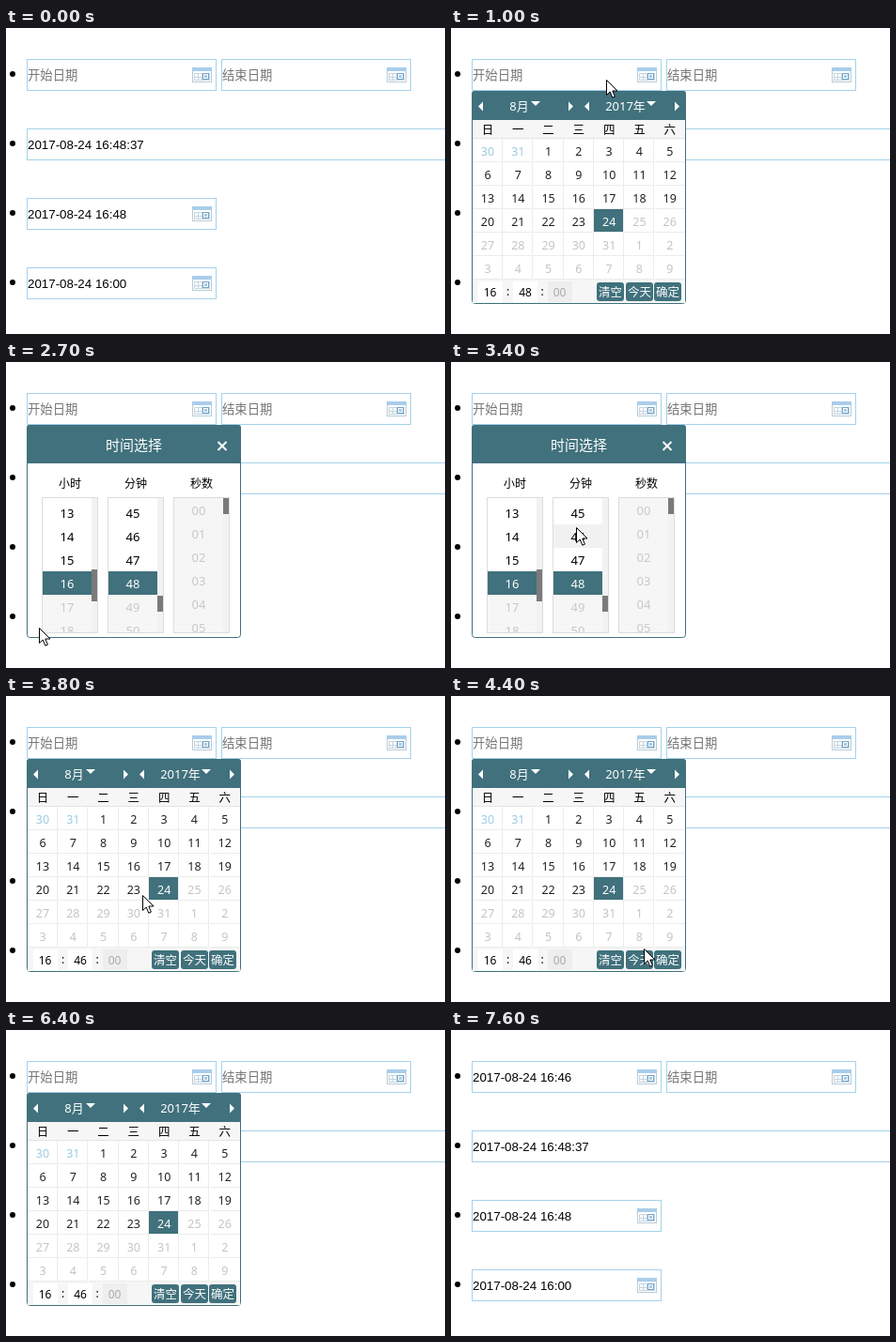
An HTML page that plays this animation: 467x326 px, repeating every 8000 ms.

```html
<!DOCTYPE html>
<html lang="zh-CN">
<head>
<meta charset="utf-8">
<title>日期选择</title>
<style>
html, body { margin: 0; width: 100%; height: 100%; overflow: hidden; background: #fff; }
svg { display: block; }
text { font-family: "Noto Sans", "Noto Sans CJK SC", sans-serif; white-space: pre; }
.field { font-family: "Liberation Sans", "Noto Sans CJK SC", sans-serif; font-size: 13.333px; }
</style>
</head>
<body>
<svg id="stage" width="467" height="326" viewBox="0 0 467 326"></svg>
<script>
const LOOP = 8000;
const TEAL = '#40717c', LINE = '#ececec', PALE = '#f6f6f6', MUTED = '#c4c4c4';

const rect = (x, y, w, h, fill, extra = '') =>
  `<rect x="${x}" y="${y}" width="${w}" height="${h}" fill="${fill}" ${extra}/>`;
const frame = (x, y, w, h, stroke, fill = '#fff', extra = '') =>
  rect(x + .5, y + .5, w - 1, h - 1, fill, `stroke="${stroke}" ${extra}`);
const path = (d, fill, extra = '') => `<path d="${d}" fill="${fill}" ${extra}/>`;
const label = (s, x, y, size, fill = '#000', extra = '') =>
  `<text x="${x}" y="${y}" font-size="${size}" fill="${fill}" text-anchor="middle" ${extra}>${s}</text>`;
const field = (s, x, y, fill = '#000', extra = '') =>
  `<text class="field" x="${x}" y="${y}" fill="${fill}" ${extra}>${s}</text>`;
const pad = n => String(n).padStart(2, '0');

function icon(x, y) {
  return frame(x, y, 21, 16, '#b9cbd8') + rect(x, y, 21, 4, '#a9cdea') +
    path(`M${x + 2} ${y + 6.5}h17M${x + 2} ${y + 10.5}h9M${x + 2} ${y + 13.5}h17` +
      `M${x + 2.5} ${y + 6}v8M${x + 6.5} ${y + 6}v8M${x + 10.5} ${y + 6}v8M${x + 18.5} ${y + 6}v8`,
      'none', 'stroke="#c6d5df"') +
    frame(x + 11, y + 6, 7, 7, '#6fa6cf') + rect(x + 13, y + 8, 3, 3, '#a8c8e0');
}

function input(x, y, w, content) {
  return frame(x, y, w, 34, '#a5d2ec') + content + (w < 300 ? icon(x + 176, y + 9) : '');
}

function page() {
  const hint = '#757575';
  let s = rect(0, 0, 467, 326, '#fff');
  for (let i = 0; i < 4; i++) s += `<circle cx="7" cy="${49 + 74 * i}" r="3"/>`;
  return s +
    input(22, 33, 202, field('开始日期', 23, 55, hint, 'id="hint"') +
      field('2017-08-24 16:46', 23, 55, '#000', 'id="picked"')) +
    input(229, 33, 202, field('结束日期', 230, 55, hint)) +
    input(22, 107, 500, field('2017-08-24 16:48:37', 23, 129)) +
    input(22, 181, 202, field('2017-08-24 16:48', 23, 203)) +
    input(22, 255, 202, field('2017-08-24 16:00', 23, 277));
}

const panel = head =>
  frame(22, 67, 228, 227, TEAL, '#fff', 'rx="3"') +
  path(`M22 ${67 + head}V70a3 3 0 0 1 3-3h222a3 3 0 0 1 3 3V${67 + head}z`, TEAL);

const side = (x, dir) => path(`M${x} 83.5l${5 * dir}-5v10z`, '#fff');
const down = x => path(`M${x} 78h10l-5 5z`, '#fff');

function calendar() {
  const colW = 226 / 7;
  const col = i => 23 + colW * i;
  let s = panel(31) + side(29, 1) + side(130, -1) + side(142, 1) + side(243, -1) +
    label('8月', 72.5, 88, 13, '#fff') + down(85) +
    label('2017年', 185.5, 88, 13, '#fff') + down(208);

  s += rect(23, 98, 226, 20, PALE) + rect(23, 117, 226, 1, '#e4e4e4');
  [...'日一二三四五六'].forEach((d, i) => s += label(d, col(i) + 16, 112.5, 12.5));

  for (let i = 0; i < 42; i++) {
    const c = i % 7, y = 118 + 25 * Math.floor(i / 7), x = Math.round(col(c));
    const n = i - 1;
    const day = n < 1 ? 30 + i : n > 31 ? n - 31 : n;
    const fill = n < 1 ? '#9ccbe2' : n === 24 ? '#fff' : n > 24 ? MUTED : '#222';
    s += rect(x, y + 24, 32, 1, LINE);
    if (c < 6) s += rect(x + 31, y, 1, 25, LINE);
    if (n === 24) s += rect(x, y, 31, 24, TEAL);
    s += label(day, col(c) + 16, y + 18, 12.5, fill);
  }

  s += rect(23, 268, 226, 25, PALE) +
    rect(29, 270, 26, 22, '#fff') + rect(66, 270, 26, 22, '#fff') + rect(103, 270, 26, 22, '#eee') +
    label('16', 41.5, 285.5, 12) + label(':', 60.5, 285, 12) +
    label('48', 79, 285.5, 12, '#000', 'id="minute"') + label(':', 97, 285, 12) +
    label('00', 115.5, 285.5, 12, '#aaa');
  [['清空', 155], ['今天', 186], ['确定', 216]].forEach(([name, x]) =>
    s += rect(x, 271, 29, 20, TEAL, 'rx="3"') + label(name, x + 14.5, 285.5, 12.5, '#fff'));
  return s;
}

const lists = [
  { name: '小时', x: 38, top: 148, first: 13, picked: 16, thumb: [221, 34] },
  { name: '分钟', x: 108, top: 148, first: 45, picked: 48, thumb: [249, 17] },
  { name: '秒数', x: 178, top: 145, first: 0, picked: -1, thumb: [145, 17] }
];

function clock() {
  let s = panel(41) + label('时间选择', 136, 94, 15, '#fff') +
    path('M225.5 85l9 9m0-9l-9 9', 'none', 'stroke="#fff" stroke-width="2"') +
    '<clipPath id="clip"><rect x="38" y="145" width="200" height="143"/></clipPath>';
  lists.forEach((l, k) => {
    s += label(l.name, l.x + 30, 134, 12) + frame(l.x, 144, 60, 145, '#dcdcdc');
    s += '<g clip-path="url(#clip)">';
    if (k < 2) s += rect(l.x + 1, 0, 52, 25, '#f1f1f1', `id="hover${k}"`);
    for (let i = 0; i < 6; i++) {
      const n = l.first + i, y = l.top + 25 * i;
      const off = n > l.picked, on = n === l.picked;
      if (off || on) s += rect(l.x + 1, y, 52, 25, on ? TEAL : PALE);
      s += label(pad(n), l.x + 27, y + 17.5, 13, on ? '#fff' : off ? '#c8c8c8' : '#000');
    }
    s += rect(l.x + 53, 145, 6, 143, '#f2f2f2') +
      rect(l.x + 53, l.thumb[0], 6, l.thumb[1], '#7a7a7a') + '</g>';
  });
  return s;
}

const arrow = path('M.5 .5V16.5L4.2 13L6.8 19.2L9.4 18.1L6.8 12H12z', '#fff',
  'stroke="#000" stroke-linejoin="round"');

const stage = document.getElementById('stage');
stage.innerHTML = page() +
  `<g id="calendar">${calendar()}</g><g id="clock">${clock()}</g><g id="cursor">${arrow}</g>`;
const $ = id => document.getElementById(id);
const show = (id, on) => $(id).setAttribute('visibility', on ? 'inherit' : 'hidden');

// pointer route: time, x, y
const route = [
  [400, 309, 72], [500, 278, 76], [600, 222, 70], [800, 165, 55],
  [1100, 165, 55], [1400, 142, 160], [1600, 80, 268], [1700, 66, 280],
  [1800, 66, 280], [1900, 62, 282], [2000, 60, 277], [2200, 60, 277], [2300, 35, 283],
  [2700, 35, 283], [3100, 90, 222], [3400, 133, 176],
  [3700, 133, 176], [3900, 156, 248], [4100, 187, 297], [4200, 195, 290], [4400, 205, 269],
  [4500, 205, 269], [4700, 198, 276], [4900, 198, 276], [5300, 229, 277],
  [5700, 229, 277], [6000, 234, 242], [6200, 234, 242], [6300, 235, 233], [6400, 235, 233]
];

function pointer(t) {
  const i = Math.max(1, route.findIndex(p => p[0] >= t));
  const [t0, x0, y0] = route[i - 1], [t1, x1, y1] = route[i];
  const k = Math.min(1, Math.max(0, (t - t0) / (t1 - t0)));
  return [Math.round(x0 + (x1 - x0) * k), Math.round(y0 + (y1 - y0) * k)];
}

function draw(time) {
  const t = Math.floor((time % LOOP) / 100) * 100; // screen refreshes ten times a second
  const picking = t >= 2600 && t < 3700;
  const done = t >= 7600;
  show('hint', !done);
  show('picked', done);
  show('calendar', t >= 1000 && !done && !picking);
  show('clock', picking);
  show('cursor', t >= 400 && t < 6400);
  $('minute').textContent = t < 3700 ? '48' : '46';

  const [x, y] = pointer(t);
  $('cursor').setAttribute('transform', `translate(${x} ${y})`);
  for (let k = 0; k < 2; k++) {
    const l = lists[k], row = Math.floor((y - l.top) / 25);
    show('hover' + k, picking && x > l.x && x < l.x + 53 && row >= 0 && row < 3);
    $('hover' + k).setAttribute('y', l.top + 25 * row);
  }
}

const start = performance.now();
function tick() {
  draw(performance.now() - start);
  requestAnimationFrame(tick);
}
tick();
</script>
</body>
</html>
```
